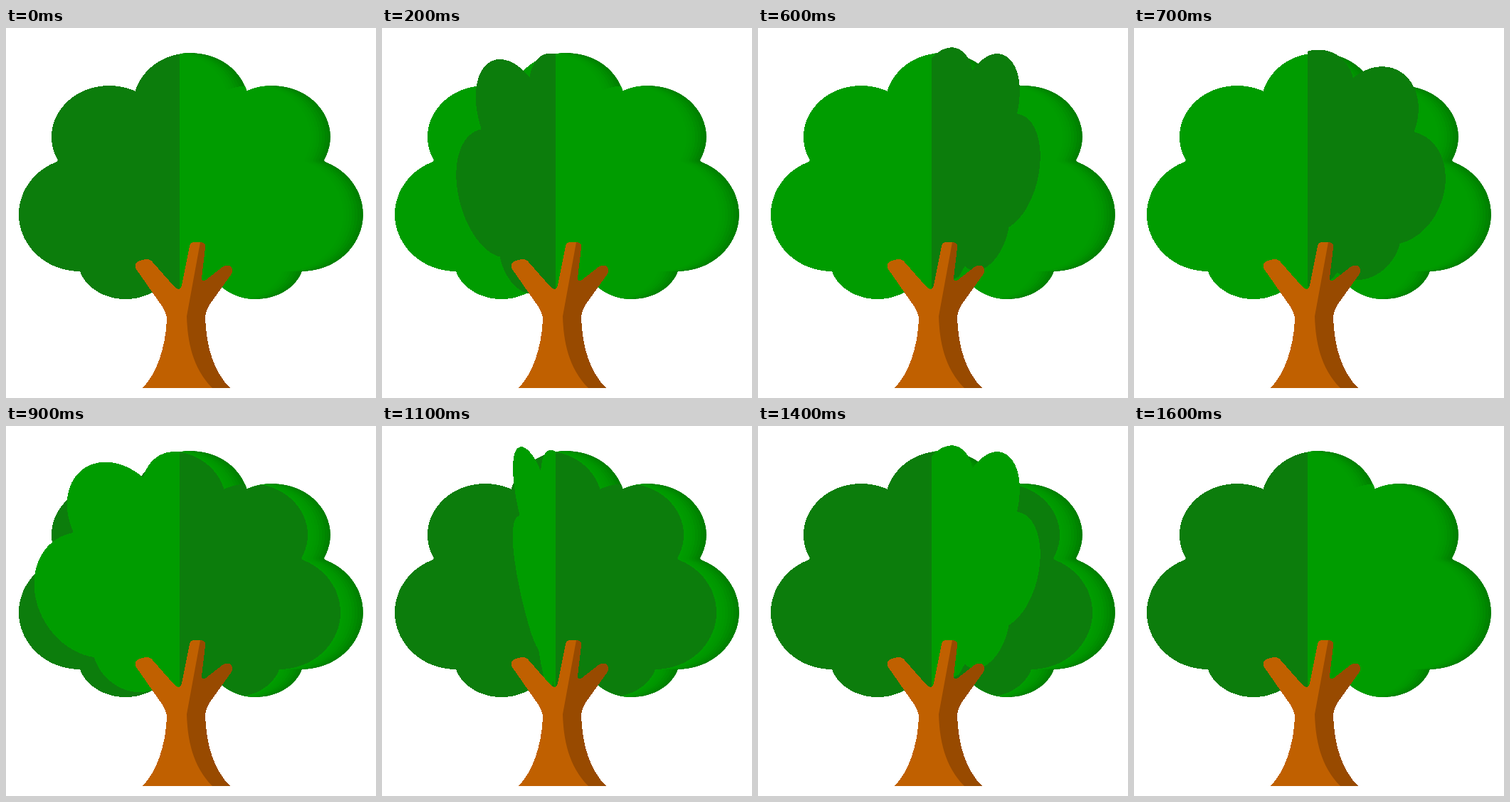
These frames come from a looping animation (520x520 px, 1700 ms). An HTML page:

```html
<!DOCTYPE html>
<html lang="en">
<head>
<meta charset="utf-8">
<title>Page-turning tree</title>
<style>
  html, body { margin: 0; width: 100%; height: 100%; overflow: hidden; background: #fff; }
  svg { display: block; width: 100vw; height: 100vh; }
</style>
</head>
<body>
<svg viewBox="0 0 520 520" shape-rendering="crispEdges">
  <defs>
    <clipPath id="west"><rect width="244" height="520"/></clipPath>
    <clipPath id="east"><rect x="244" width="276" height="520"/></clipPath>
    <clipPath id="crown"><path id="crownEdge"/></clipPath>
    <clipPath id="shade"><path d="M273 290V301L254 405C255 440 262 478 290 506H330V290Z"/></clipPath>
    <path id="trunk" d="M192 506C212 485 224 450 226 410Q226 402 220 392L183 339Q179 330 188 327L196 325Q202 324 206 329L237 364Q244 371 247 362L258 307Q259 301 265 301H273Q281 301 280 309L275 351Q274 357 281 354L304 336Q310 332 316 335Q320 341 316 347L288 386Q280 398 280 408C282 450 292 483 315 506Z"/>
  </defs>
  <g clip-path="url(#west)"><path id="left"/></g>
  <g clip-path="url(#east)"><g clip-path="url(#crown)"><g id="rim"/><path id="right"/></g></g>
  <g id="turn"><path id="page"/></g>
  <use href="#trunk" fill="#c06000"/>
  <g clip-path="url(#shade)"><use href="#trunk" fill="#984a00"/></g>
</svg>
<script>
const $ = id => document.getElementById(id);
const DARK = '#0c7d0c', LIGHT = '#009c00';
const HINGE = 244, STEP = 100, STEPS = 17, TURN = 8;
const RIM = 32, LAYERS = 8;

// Half a crown, measured outward from the hinge.
const outline = [];
function lobe(cx, cy, rx, ry, from, to) {
  for (let deg = from; deg <= to; deg += 3) {
    const a = deg * Math.PI / 180;
    outline.push([cx + rx * Math.cos(a), cy + ry * Math.sin(a)]);
  }
}
lobe(-16, 107, 81, 72, -141, -15);
lobe(99, 153, 81, 72, -117, 27);
lobe(140, 262, 86, 80, -68, 91);
lobe(76, 326, 67, 55, 16, 139);
outline.push([10, 372], [-120, 372], [-120, 61]);

function shape(side, map = p => p, origin = HINGE) {
  return 'M' + outline.map(p => {
    const [u, y] = map(p);
    return (origin + side * u).toFixed(1) + ' ' + y.toFixed(1);
  }).join('L') + 'Z';
}

// The rising page swings toward the viewer and leans at the top.
function lift(n) {
  const bend = n * (n - 1), eye = 546;
  const depth = 0.00055 + 0.00005 * bend;
  return ([u, y]) => {
    const k = 1 / (1 - depth * u);
    return [u * (1 - 0.208 * n - 0.00011 * bend * y) * k, eye + (y - eye) * k];
  };
}

// The falling page is sheared upward, then flattens out (s: 0 to 1).
function drop(s) {
  const width = 0.1 + 0.89 * s;
  const slope = 0.52 * (1 - s) ** 0.75;
  const bulge = Math.sin(Math.PI * s);
  return ([u, y]) => [
    width * u + bulge * (18 + 0.034 * y) + 5 * (1 - s),
    y * (1 - 0.035 * bulge) - slope * u - 7 * bulge
  ];
}

// Page number n of a turn: three steps up on the left, then down on the right.
const pagePath = n => n < 4 ? shape(-1, lift(n)) : shape(1, drop((n - 4) / 4));

// Stacked layers shade the outer edge.
for (let i = 0; i < LAYERS; i++) {
  const layer = document.createElementNS('http://www.w3.org/2000/svg', 'path');
  const green = 156 - 30 * (1 - i / LAYERS) ** 2;
  layer.setAttribute('d', shape(1, undefined, HINGE + RIM * (1 - i / LAYERS)));
  layer.setAttribute('fill', `rgb(0,${Math.round(green)},0)`);
  $('rim').append(layer);
}
$('left').setAttribute('d', shape(-1));
$('right').setAttribute('d', shape(1));
$('crownEdge').setAttribute('d', shape(1, undefined, HINGE + RIM));

function draw(ms) {
  const step = Math.floor(ms / STEP) % STEPS || STEPS - 1;
  const n = (step - 1) % TURN + 1;
  const [front, back] = step <= TURN ? [DARK, LIGHT] : [LIGHT, DARK];
  const landed = n === TURN;
  const rightFill = landed === (step <= TURN) ? DARK : LIGHT;
  $('left').setAttribute('fill', back);
  $('right').setAttribute('fill', rightFill);
  $('page').setAttribute('fill', front);
  $('page').setAttribute('d', landed ? '' : pagePath(n));
  $('turn').setAttribute('clip-path', `url(#${n < 4 ? 'west' : 'east'})`);
}

const start = performance.now();
function tick() {
  draw(performance.now() - start);
  requestAnimationFrame(tick);
}
tick();
</script>
</body>
</html>
```
